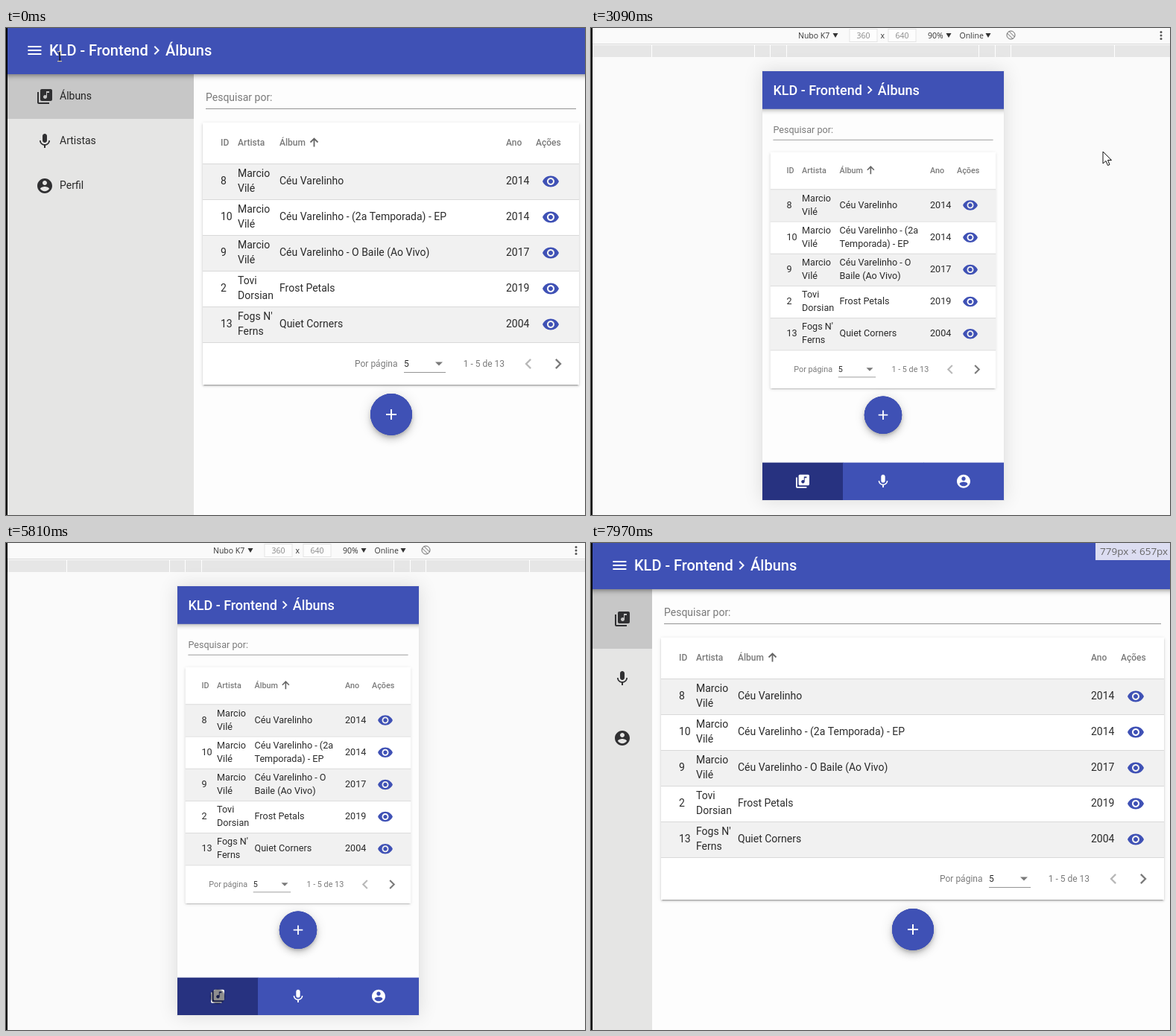
An HTML page with a canvas that plays this animation: 777 by 654 pixels, repeating every 8 s.

```html
<!DOCTYPE html>
<html lang="pt">
<head>
<meta charset="utf-8">
<title>Álbuns</title>
<style>
html, body { margin: 0; width: 100%; height: 100%; overflow: hidden; background: #fdfdfd; }
canvas { display: block; width: 777px; height: 654px; }
</style>
</head>
<body>
<canvas id="stage" width="777" height="654"></canvas>
<script>
const ctx = document.getElementById('stage').getContext('2d');
const LOOP = 8000, STEP = 75;
const BLUE = '#3f51b5', INK = 'rgba(0,0,0,.83)', SOFT = 'rgba(0,0,0,.52)', RULE = '#d9d9d9';

const icon = {
  menu: 'M3 18h18v-2H3v2zm0-5h18v-2H3v2zm0-7v2h18V6H3z',
  next: 'M10 6L8.59 7.41 13.17 12l-4.58 4.59L10 18l6-6z',
  prev: 'M15.41 7.41L14 6l-6 6 6 6 1.41-1.41L10.83 12z',
  add: 'M19 13h-6v6h-2v-6H5v-2h6V5h2v6h6v2z',
  eye: 'M12 4.5C7 4.5 2.73 7.61 1 12c1.73 4.39 6 7.5 11 7.5s9.27-3.11 11-7.5c-1.73-4.39-6-7.5-11-7.5zM12 17c-2.76 0-5-2.24-5-5s2.24-5 5-5 5 2.24 5 5-2.24 5-5 5zm0-8c-1.66 0-3 1.34-3 3s1.34 3 3 3 3-1.34 3-3-1.34-3-3-3z',
  music: 'M20 2H8c-1.1 0-2 .9-2 2v12c0 1.1.9 2 2 2h12c1.1 0 2-.9 2-2V4c0-1.1-.9-2-2-2zm-2 5h-3v5.5c0 1.38-1.12 2.5-2.5 2.5S10 13.88 10 12.5s1.12-2.5 2.5-2.5c.57 0 1.08.19 1.5.51V5h4v2zM4 6H2v14c0 1.1.9 2 2 2h14v-2H4V6z',
  mic: 'M12 14c1.66 0 2.99-1.34 2.99-3L15 5c0-1.66-1.34-3-3-3S9 3.34 9 5v6c0 1.66 1.34 3 3 3zm5.3-3c0 3-2.54 5.1-5.3 5.1S6.7 14 6.7 11H5c0 3.41 2.72 6.23 6 6.72V21h2v-3.28c3.28-.48 6-3.3 6-6.72h-1.7z',
  user: 'M12 2C6.48 2 2 6.48 2 12s4.48 10 10 10 10-4.48 10-10S17.52 2 12 2zm0 3c1.66 0 3 1.34 3 3s-1.34 3-3 3-3-1.34-3-3 1.34-3 3-3zm0 14.2c-2.5 0-4.71-1.28-6-3.22.03-1.99 4-3.08 6-3.08 1.99 0 5.97 1.09 6 3.08-1.29 1.94-3.5 3.22-6 3.22z'
};
for (const k in icon) icon[k] = new Path2D(icon[k]);

const menu = [['music', 'Álbuns'], ['mic', 'Artistas'], ['user', 'Perfil']];
// A bar marks where text wraps.
const albums = [
  [8, 'Marcio|Vilé', 'Céu Varelinho', 2014],
  [10, 'Marcio|Vilé', 'Céu Varelinho - (2a|Temporada) - EP', 2014],
  [9, 'Marcio|Vilé', 'Céu Varelinho - O|Baile (Ao Vivo)', 2017],
  [2, 'Tovi|Dorsian', 'Frost Petals', 2019],
  [13, "Fogs N'|Ferns", 'Quiet Corners', 2004]
];
const artists = [[4, "Fogs N' Ferns"], [3, 'Marcio Vilé'], [2, 'Nick Harudai'], [1, 'Tovi Dorsian']];

// Layers of each shadow: offset, blur, spread, opacity.
const lift = {
  card: [[3, 1, -2, .2], [2, 2, 0, .14], [1, 5, 0, .12]],
  bar: [[2, 4, -1, .2], [4, 5, 0, .14], [1, 10, 0, .12]],
  button: [[3, 5, -1, .2], [6, 10, 0, .14], [1, 18, 0, .12]]
};

const ramp = (t, a, b) => Math.min(1, Math.max(0, (t - a) / (b - a)));
const easeOut = p => 1 - (1 - p) ** 3;
const mix = (a, b, p) => a + (b - a) * p;

function rect(x, y, w, h, color) {
  ctx.fillStyle = color;
  ctx.fillRect(x, y, w, h);
}
function disc(x, y, r, color) {
  ctx.fillStyle = color;
  ctx.beginPath();
  ctx.arc(x, y, r, 0, 7);
  ctx.fill();
}
function poly(points, color) {
  ctx.fillStyle = color;
  ctx.beginPath();
  points.forEach(p => ctx.lineTo(...p));
  ctx.closePath();
  ctx.fill();
}
function text(str, x, y, size = 14, color = INK, weight = 400, family = 'Roboto') {
  ctx.font = `${weight} ${size}px ${family}, sans-serif`;
  ctx.fillStyle = color;
  ctx.fillText(str, x, y);
}
function glyph(name, x, y, color, size = 24) {
  ctx.save();
  ctx.translate(x - size / 2, y - size / 2);
  ctx.scale(size / 24, size / 24);
  ctx.fillStyle = color;
  ctx.fill(icon[name], 'evenodd');
  ctx.restore();
}
// Calls draw(spread) once per shadow layer, then plain on top.
function raised(layers, draw) {
  const scale = ctx.getTransform().a;
  ctx.save();
  for (const [dy, blur, spread, alpha] of layers) {
    ctx.shadowColor = `rgba(0,0,0,${alpha})`;
    ctx.shadowBlur = blur * scale;
    ctx.shadowOffsetY = dy * scale;
    draw(spread);
  }
  ctx.restore();
  draw(0);
}
function lines(str, x, mid, wrap) {
  const parts = wrap ? str.split('|') : [str.replace('|', ' ')];
  parts.forEach((part, i) => text(part, x, mid + 4 + (i - (parts.length - 1) / 2) * 20));
}
function sortArrow(x, y) {
  ctx.strokeStyle = 'rgba(0,0,0,.6)';
  ctx.lineWidth = 1.8;
  ctx.beginPath();
  ctx.moveTo(x, y + 6);
  ctx.lineTo(x, y - 5);
  ctx.moveTo(x - 5, y);
  ctx.lineTo(x, y - 5);
  ctx.lineTo(x + 5, y);
  ctx.stroke();
}

function table(left, right, top, page, wrap) {
  const isAlbums = page === 'Álbuns', rows = isAlbums ? albums : artists;
  const bottom = top + 56 + rows.length * 48 + 57;
  raised(lift.card, s => rect(left - s, top + 1 - s, right - left + 2 * s, bottom - top - 1 + 2 * s, '#fff'));

  const head = (str, x) => text(str, x, top + 32, 12, SOFT, 500);
  const nameX = left + (isAlbums ? 47 : 39);
  head('ID', left + 24);
  head(isAlbums ? 'Artista' : 'Artista / banda', nameX);
  if (isAlbums) {
    head('Álbum', left + 103);
    head('Ano', right - 98);
  }
  head('Ações', right - 58);
  sortArrow(isAlbums ? left + 149.5 : left + 130, top + 27.5);

  rows.forEach(([id, name, album, year], i) => {
    const y = top + 56 + i * 48, mid = y + 24;
    if (i % 2 === 0) rect(left, y, right - left, 48, '#f1f1f1');
    rect(left, y, right - left, 1, RULE);
    text(id, left + 24, mid + 4);
    lines(name, nameX, mid, true);
    if (isAlbums) {
      lines(album, left + 103, mid, wrap);
      text(year, right - 98, mid + 4);
    }
    glyph('eye', right - 38, mid, BLUE);
  });

  const foot = bottom - 57, dx = isAlbums ? 0 : 7;
  rect(left, foot, right - left, 1, RULE);
  text('Por página', right - 301 + dx, foot + 33, 12, SOFT);
  text('5', right - 235 + dx, foot + 33, 12, INK);
  rect(right - 235 + dx, foot + 40, 56, 1, 'rgba(0,0,0,.42)');
  const tx = right - 188 + dx;
  poly([[tx - 5, foot + 26.5], [tx + 5, foot + 26.5], [tx, foot + 31.5]], SOFT);
  ctx.textAlign = 'right';
  text(isAlbums ? '1 - 5 de 13' : '1 - 4 de 4', right - 100, foot + 33, 12, SOFT);
  ctx.textAlign = 'left';
  glyph('prev', right - 68, foot + 29, 'rgba(0,0,0,.28)', 28);
  glyph('next', right - 28, foot + 29, isAlbums ? SOFT : 'rgba(0,0,0,.28)', 28);
  return bottom;
}

function sidebar(side, top, height, item) {
  ctx.save();
  ctx.beginPath();
  ctx.rect(0, top, side, height);
  ctx.clip();
  rect(0, top, side, height, '#e5e5e4');
  rect(0, top, side, item, '#c7c7c7');
  const x = side < 80 ? side - 40 : 40 + (side - 80) / 17;
  menu.forEach(([name, label], i) => {
    const y = top + item * (i + .5);
    glyph(name, x, y, '#303032');
    if (side > 100) text(label, 70, y + 4);
  });
  ctx.restore();
}

function bottomNav(w, h, pick, glow) {
  menu.forEach(([name], i) => {
    const x = i * w / 3, p = [1 - pick, pick, 0][i];
    rect(x, h - 56, w / 3 + .5, 56, `rgb(${mix(63, 39, p)},${mix(81, 50, p)},${mix(181, 128, p)})`);
    if (glow[i]) rect(x, h - 56, w / 3, 56, `rgba(51,181,229,${glow[i]})`);
    glyph(name, x + w / 6, h - 28, '#fff');
  });
}

// Lays out the page in its own pixels; "view" is the visible width.
function app(o) {
  const { x, y, scale = 1, w, view = w, h, side = 0, item = 80, mobile = false, page = 'Álbuns' } = o;
  const bar = mobile ? 56 : 64, right = mobile ? w + side : w;
  ctx.save();
  ctx.translate(x, y);
  ctx.scale(scale, scale);
  ctx.beginPath();
  ctx.rect(0, 0, view, h);
  ctx.clip();
  rect(0, 0, view, h, '#fdfdfd');

  text('Pesquisar por:', side + 16, bar + 36, 14, SOFT);
  rect(side + 16, bar + 46, right - side - 32, 1, 'rgba(0,0,0,.42)');
  const end = table(side + 12, right - 12, bar + 64, page, w < 500);
  const fx = Math.round((side + right) / 2) - (page === 'Álbuns' ? 0 : 5);
  raised(lift.button, s => disc(fx, end + 40, 28 + s, BLUE));
  glyph('add', fx, end + 40, '#fff');

  if (side > 0) sidebar(side, bar, h - bar, item);
  raised(lift.bar, s => rect(-9, -9, view + 18, bar + 9 + s, BLUE));
  const tx = mobile ? 16 : 56;
  if (!mobile) {
    if (o.ripple) disc(36, 32, 20 * o.ripple.size, `rgba(255,255,255,${o.ripple.alpha})`);
    glyph('menu', 36.4, 32, '#fff');
  }
  text('KLD - Frontend', tx, bar / 2 + 7, 20, '#fff', 500);
  glyph('next', tx + 144, bar / 2, '#fff');
  text(page, tx + 156, bar / 2 + 7, 20, '#fff', 500);
  if (mobile) bottomNav(w, h, o.pick || 0, o.glow || []);
  ctx.restore();
}

function devtools() {
  rect(0, 0, 777, 654, '#fafafa');
  const label = (str, x, color = '#333') => text(str, x, 14, 10.5, color, 400, '"Open Sans"');
  const drop = x => poly([[x - 3.5, 7], [x + 3.5, 7], [x, 13]], '#333');
  label('Nubo K7', 278);
  drop(328);
  for (const [x, n] of [[346.5, '360'], [398.5, '640']]) {
    rect(x, 1, 38, 18, '#e4e4e4');
    rect(x + 1, 2, 36, 16, '#fdfdfd');
    label(n, x + 10, '#888');
  }
  label('x', 388.5);
  label('90%', 452);
  drop(480);
  label('Online', 494.5);
  drop(533);
  ctx.strokeStyle = '#666';
  ctx.lineWidth = 1;
  ctx.beginPath();
  ctx.arc(563.5, 9.5, 5.5, 0, 7);
  ctx.moveTo(558.5, 7);
  ctx.lineTo(566, 14.5);
  ctx.moveTo(561, 4.5);
  ctx.lineTo(568.5, 12);
  ctx.stroke();
  for (const y of [5.5, 10, 14.5]) disc(765, y, 1.5, '#555');
  rect(0, 21, 777, 1, '#d8d8d8');
  rect(0, 23, 777, 16, '#e6e6e6');
  for (const x of [81, 219, 240, 262, 520, 542, 563, 702]) rect(x, 23, 1, 16, '#fff');
  raised([[0, 24, 0, .12]], () => rect(229, 57, 326, 578, '#e6e6e6'));
}

function outlined(points, x, y) {
  poly(points.map(([a, b]) => [x + a, y + b]), '#fff');
  ctx.strokeStyle = '#111';
  ctx.lineWidth = 1;
  ctx.stroke();
}
function arrow(x, y) {
  outlined([[0, 0], [0, 16], [4, 12.5], [6.5, 18.5], [9, 17.5], [6.5, 11.5], [11.5, 11.5]], x, y);
}
function hand(x, y) {
  outlined([[0, 0], [2, 0], [3, 6], [9, 8], [10, 13], [8, 18], [1, 18], [-5, 11], [-3, 10], [-1, 12]], x, y);
}
function beam(x, y) {
  rect(x - .5, y - 6, 1.5, 12, '#1c1c1c');
  rect(x - 3, y - 7, 6, 1.2, '#d8c9a0');
  rect(x - 3, y + 6, 6, 1.2, '#d8c9a0');
}

const path = [
  [3090, 687, 166], [3615, 387, 613], [3770, 387, 613], [3845, 390, 611], [4370, 390, 611],
  [4550, 434, 602], [4930, 468, 599], [5100, 470, 600], [5250, 470, 600], [5270, 410, 603],
  [5345, 284, 609], [6040, 284, 609], [6570, 756, 124]
];
function pointer(t) {
  if (t < 3090 || t > 6640) return;
  let i = path.findIndex(p => p[0] > t);
  if (i < 0) i = path.length;
  const a = path[i - 1], b = path[i] || a, p = a === b ? 0 : ramp(t, a[0], b[0]);
  const x = mix(a[1], b[1], p), y = mix(a[2], b[2], p);
  if (x > 554) return arrow(x, y);
  disc(x, y, 10.5, 'rgba(0,0,0,.2)');
  disc(x, y, 9.5, 'rgba(0,0,0,.3)');
}

const wide = { x: 2, y: -2, w: 779, h: 657 };
const phone = { x: 230, y: 58, scale: .9, w: 360, h: 640, mobile: true };
const tapGlow = (t, at) => t < at ? 0 : .4 * (1 - ramp(t, at + 230, at + 380));
const TAP_ARTISTS = 3770, TAP_ALBUMS = 5345;

function desktopStart(t) {
  const p = easeOut(ramp(t, 230, 680));
  const ripple = t < 230 ? null : { size: easeOut(ramp(t, 155, 455)), alpha: .16 * (1 - ramp(t, 455, 840)) };
  app({ ...wide, side: mix(250, 80, p), item: mix(60, 80, p), ripple });
  if (t < 80) beam(72, 38);
  else if (t < 830) hand(mix(58, 38, ramp(t, 80, 230)), 32);
}
function device(t) {
  devtools();
  if (t < 1675) return app({ ...phone, w: 779, view: 360, side: 80, item: 56, mobile: false });
  const swapped = at => t >= at + 70;
  app({
    ...phone,
    side: 80 * (1 - easeOut(ramp(t, 1675, 2125))),
    item: 56,
    page: swapped(TAP_ARTISTS) && !swapped(TAP_ALBUMS) ? 'Artistas' : 'Álbuns',
    pick: ramp(t, TAP_ARTISTS + 45, TAP_ARTISTS + 445) - ramp(t, TAP_ALBUMS + 45, TAP_ALBUMS + 445),
    glow: [tapGlow(t, TAP_ALBUMS), tapGlow(t, TAP_ARTISTS)]
  });
  pointer(t);
}
function desktopEnd(t) {
  if (t < 7735) app({ ...wide, mobile: true });
  else app({ ...wide, side: 80 * easeOut(ramp(t, 7660, 7955)) });
  rect(677, 0, 100, 23, '#dcddf1');
  text('779px × 657px', 683, 16, 13.5, '#666', 400, '"Open Sans"');
}

// The screen refreshes in short steps, restarted at each burst of activity.
const bursts = [0, 80, 1600, 3090, 3770, 4630, 5100, 5270, 6120, 7660];
function draw(now) {
  const time = now % LOOP;
  const base = bursts.filter(b => b <= time).pop();
  const t = base + Math.floor((time - base) / STEP) * STEP;
  ctx.clearRect(0, 0, 777, 654);
  if (t < 1600) desktopStart(t);
  else if (t < 7660) device(t);
  else desktopEnd(t);
  rect(0, 0, 2, 654, '#000');
}

const start = performance.now();
function loop() {
  draw(performance.now() - start);
  requestAnimationFrame(loop);
}
loop();
</script>
</body>
</html>
```
